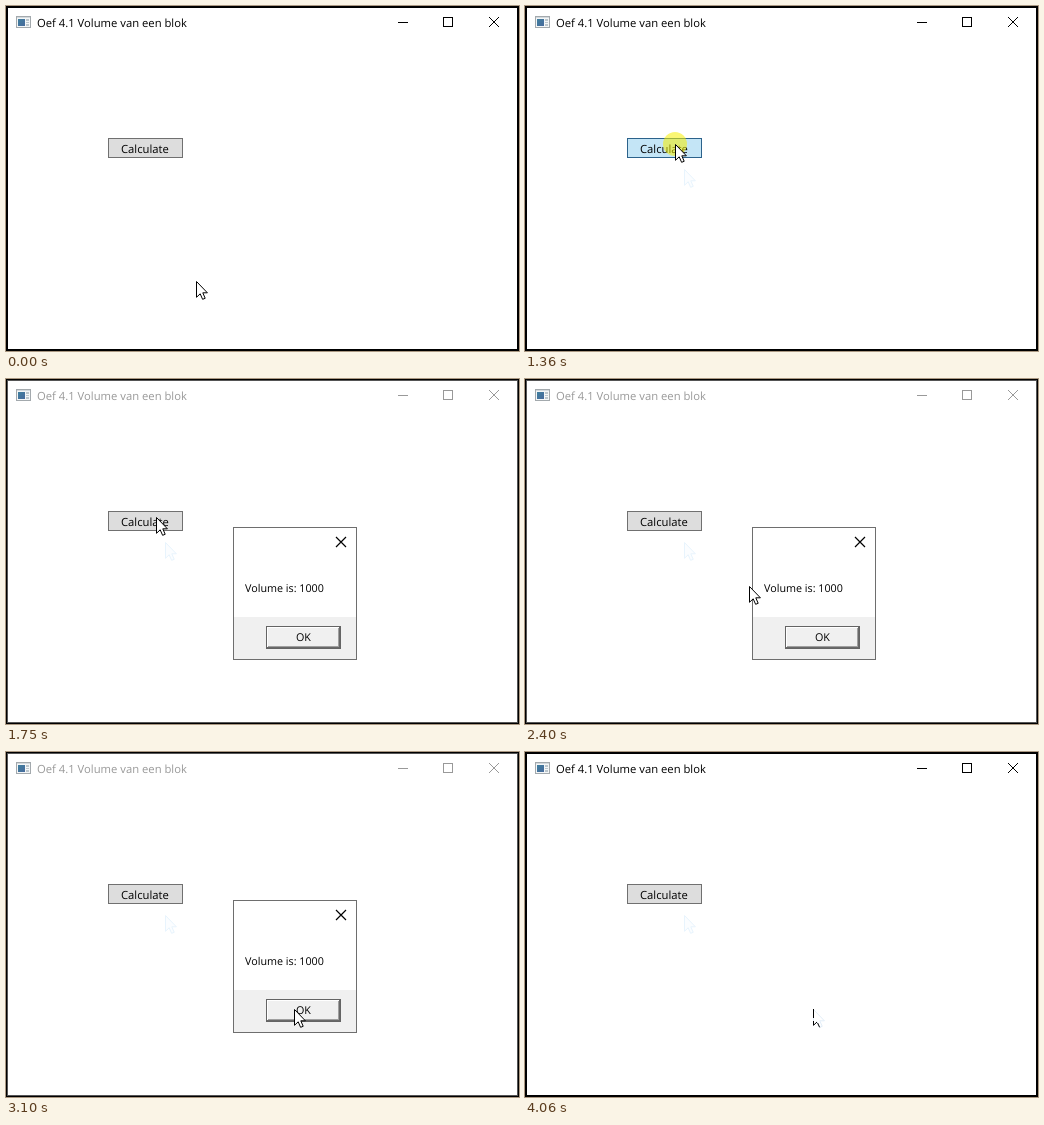
An HTML page that plays this animation: 513x345 px, repeating every 5.07 s.

```html
<!DOCTYPE html>
<html lang="nl">
<head>
<meta charset="utf-8">
<title>Volume</title>
<style>
  html, body { margin: 0; width: 100%; height: 100%; overflow: hidden; background: #fff; }
  svg { display: block; width: 513px; height: 345px; }
  text { font: 11.25px "Open Sans", "Noto Sans", sans-serif; text-rendering: geometricPrecision; }
  .msg { font-size: 10.75px; }
  .line { fill: none; stroke: #000; }
  .crisp { shape-rendering: crispEdges; }
</style>
</head>
<body>
<svg viewBox="0 0 513 345">
  <defs>
    <linearGradient id="pane" x2="1" y2="1">
      <stop stop-color="#3f7f9f"/><stop offset="1" stop-color="#486a9c"/>
    </linearGradient>
    <path id="arrow" d="M.5.5V16.3L4.2 12.8 6.6 18.3 9.2 17.3 6.8 11.8H11.4Z"/>
  </defs>

  <rect width="513" height="345" fill="#fff"/>
  <g class="crisp" fill="none">
    <rect x=".5" y=".5" width="512" height="344" stroke="#000"/>
    <rect id="rim" x="1.5" y="1.5" width="510" height="342"/>
  </g>

  <g class="crisp">
    <rect x="10.5" y="10.5" width="14" height="11" fill="#f4f6f7" stroke="#a3a9ad"/>
    <rect x="11" y="11" width="13" height="1" fill="#d3d9dd"/>
    <rect x="12" y="13" width="7" height="7" fill="url(#pane)"/>
    <path d="M20 13h3v2h-3zM20 16h3v1h-3zM20 18h3v2h-3z" fill="#bcc6cc"/>
  </g>
  <text id="title" x="31" y="21">Oef 4.1 Volume van een blok</text>
  <g id="caption" class="line">
    <path class="crisp" d="M392 16.5h10M437.5 11.5h9v9h-9z"/>
    <path d="M483 11l10 10M493 11l-10 10"/>
  </g>

  <rect id="calc" class="crisp" x="102.5" y="132.5" width="74" height="19"/>
  <text x="115" y="147">Calculate</text>

  <use id="trace" href="#arrow" x="159" y="163" fill="#fbfdff" stroke="#e8f4fd"/>

  <g id="dialog">
    <g class="crisp">
      <rect x="227.5" y="148.5" width="123" height="132" fill="#fff" stroke="#6e6e6e"/>
      <rect x="228" y="238" width="122" height="42" fill="#f0f0f0"/>
      <rect x="260.5" y="247.5" width="74" height="22" fill="#f0f0f0" stroke="#646464"/>
      <g id="raised" class="line">
        <path d="M261.5 268V248.5H333" stroke="#fff"/>
        <path d="M262 267.5H332.5V249" stroke="#a0a0a0"/>
        <path d="M261 268.5H333.5V248" stroke="#696969"/>
      </g>
      <rect id="sunken" class="line" x="261.5" y="248.5" width="72" height="20" style="stroke:#a0a0a0"/>
    </g>
    <path class="line" d="M330 158l10 10M340 158l-10 10" stroke-width="1.2"/>
    <text class="msg" x="239" y="213">Volume is: 1000</text>
    <text id="ok" class="msg" x="290" y="262">OK</text>
  </g>

  <circle id="click" r="12" fill="#f5ee00" fill-opacity=".55"/>
  <use id="cursor" href="#arrow" fill="#fff" stroke="#000"/>
  <g id="rest" transform="translate(288 257)">
    <use href="#arrow" fill="#fff" stroke="#e3eef8"/>
    <path class="line" d="M.5 0V9M.5 12V16.3L4 13M4.6 14L6.6 18.3"/>
  </g>
</svg>
<script>
  const LOOP = 5070;
  const $ = id => document.getElementById(id);

  // [time, x, y]
  const path = [
    [0, 190, 275],
    [250, 189, 268], [320, 186, 252], [400, 180, 231], [470, 173, 205],
    [550, 166, 183], [630, 159, 163], [740, 154, 150],
    [810, 151, 141], [880, 150, 138],
    [2090, 153, 141], [2170, 163, 153], [2250, 181, 172], [2320, 204, 192],
    [2400, 224, 207], [2480, 240, 217], [2540, 251, 225],
    [2620, 258, 231], [2700, 265, 236], [2780, 272, 242], [2860, 278, 247],
    [2940, 283, 252], [3020, 286, 255], [3100, 288, 257]
  ];
  // [time, opacity]
  const fade = [
    [0, 0], [1510, .25], [1590, .6], [1670, .88], [1750, 1],
    [3900, .55], [3980, .15], [4060, 0]
  ];
  // [time, fill, border]
  const button = [
    [0, "#ddd", "#707070"], [740, "#bee6fd", "#3c7fb1"],
    [1360, "#c4e5f6", "#2c628b"], [1430, "#bee6fd", "#3c7fb1"],
    [1510, "#ddd", "#707070"]
  ];

  const at = (steps, t) => steps.findLast(s => s[0] <= t);
  const within = (t, from, to) => t >= from && t < to;
  const show = (id, on) => $(id).setAttribute("visibility", on ? "visible" : "hidden");

  function draw(t) {
    const [, x, y] = at(path, t);
    const [, fill, border] = at(button, t);
    const active = !within(t, 1510, 3900);
    const pressed = within(t, 3740, 3900);
    const rest = t >= 4060;

    $("cursor").setAttribute("transform", `translate(${x} ${y})`);
    $("click").setAttribute("transform", `translate(${x} ${y})`);
    show("cursor", !rest);
    show("rest", rest);
    show("click", within(t, 1360, 1510) || pressed);
    show("trace", t >= 740);

    $("calc").setAttribute("fill", fill);
    $("calc").setAttribute("stroke", border);
    $("rim").setAttribute("stroke", active ? "#000" : "#555");
    $("title").setAttribute("fill", active ? "#000" : "#999");
    $("caption").style.stroke = active ? "#000" : "#999";

    $("dialog").setAttribute("opacity", at(fade, t)[1]);
    $("raised").setAttribute("opacity", pressed ? 0 : 1);
    $("sunken").setAttribute("opacity", pressed ? 1 : 0);
    $("ok").setAttribute("transform", pressed ? "translate(1 1)" : "");
  }

  const start = performance.now();
  function tick() {
    draw((performance.now() - start) % LOOP);
    requestAnimationFrame(tick);
  }
  tick();
</script>
</body>
</html>
```
